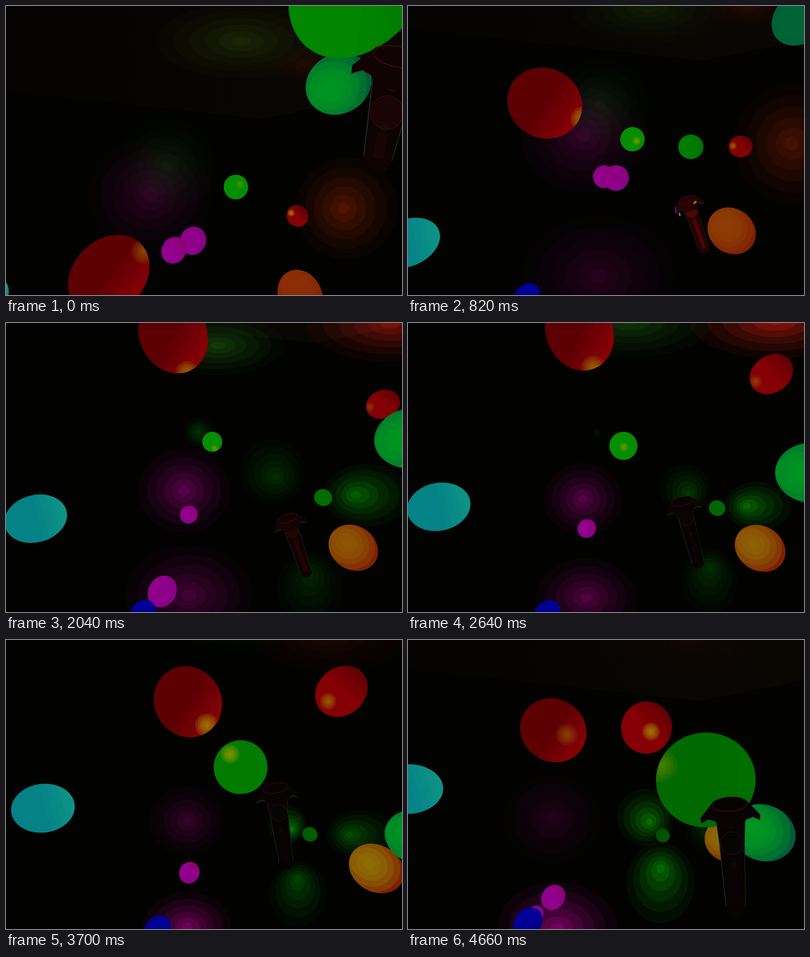
An HTML page with a canvas for the animation above (4.76 s loop, 875 by 640 pixels).

```html
<!DOCTYPE html>
<html lang="en">
<head>
<meta charset="utf-8">
<title>Glowing balls</title>
<style>
  html, body { margin: 0; width: 100%; height: 100%; overflow: hidden; background: #020201; }
  canvas { display: block; }
</style>
</head>
<body>
<canvas id="stage" width="875" height="640"></canvas>
<script>
const ctx = document.getElementById('stage').getContext('2d');
const LOOP = 4760, LAST = 77, TAU = Math.PI * 2;
const VIEW = { x: 500, y: 320, focal: 500 };
const YELLOW = [165, 150, 0];
let step = 0, pan = [0, 0];

const clamp = (v, lo = 0, hi = 1) => Math.min(hi, Math.max(lo, v));
const mix = (a, b, t) => a.map((v, i) => v + (b[i] - v) * t);
const rgb = c => `rgb(${c.map(v => Math.round(clamp(v, 0, 255))).join()})`;
const distance = (a, b) => Math.hypot(b.x - a.x, b.y - a.y);

// Smooth curve through a few keys [step, ...values], without overshoot.
function follow(keys) {
  const s = clamp(step, keys[0][0], keys[keys.length - 1][0]);
  let k = 0;
  while (k < keys.length - 2 && s >= keys[k + 1][0]) k++;
  const span = keys[k + 1][0] - keys[k][0], t = (s - keys[k][0]) / span, u = 1 - t;
  return keys[0].slice(1).map((_, i) => {
    const c = i + 1;
    const slope = n => (keys[n + 1][c] - keys[n][c]) / (keys[n + 1][0] - keys[n][0]);
    const tangent = n => {
      const a = slope(Math.max(0, n - 1)), b = slope(Math.min(n, keys.length - 2));
      return a * b > 0 ? 2 * a * b / (a + b) : 0;
    };
    return keys[k][c] * (1 + 2 * t) * u * u + keys[k + 1][c] * t * t * (3 - 2 * t)
      + span * t * u * (tangent(k) * u - tangent(k + 1) * t);
  });
}

// Keys hold room coordinates; the camera pan moves everything alike.
function place(...keys) {
  const [x, y, r, light] = follow(keys);
  return { x: x + pan[0], y: y + pan[1], r, light };
}

function oval(x, y, rx, ry = rx, rot = 0) {
  ctx.beginPath();
  ctx.ellipse(x, y, rx, ry, rot, 0, TAU);
}

// Banded pool of light; its core is shifted by dx, dy.
function glow({ x, y, r, light }, color, aspect = 1, dx = 0, dy = 0) {
  const n = 6, level = i => (i / n) ** 1.3;
  ctx.globalCompositeOperation = 'lighter';
  for (let i = 0; i < n; i++) {
    const s = (1 - i / n) ** 1.2, gain = light * (level(i + 1) - level(i));
    ctx.fillStyle = rgb(color.map(v => v * gain));
    oval(x + dx * (1 - s), y + dy * (1 - s), r * s * aspect, r * s / aspect);
    ctx.fill();
  }
  ctx.globalCompositeOperation = 'source-over';
}

function bands(gradient, from, to, curve) {
  const n = 6;
  for (let i = 0; i < n; i++) {
    const c = rgb(mix(from, to, (i / (n - 1)) ** curve));
    gradient.addColorStop(i / n, c);
    gradient.addColorStop((i + 1) / n, c);
  }
  return gradient;
}

// A sphere in wide-angle perspective: stretched away from the middle of the view.
function ball(b, from, to, dir, lamp) {
  const d = distance(b, VIEW), rot = Math.atan2(b.y - VIEW.y, b.x - VIEW.x);
  ctx.save();
  ctx.translate(b.x, b.y);
  ctx.rotate(rot);
  ctx.scale(b.r * Math.hypot(1, d / VIEW.focal), b.r);
  oval(0, 0, 1);
  if (dir === 'centre') {
    ctx.fillStyle = bands(ctx.createRadialGradient(-.3, 0, 0, -.3, 0, 1.35), from, to, 2);
  } else {
    const cx = Math.cos(dir - rot), cy = Math.sin(dir - rot);
    ctx.fillStyle = bands(ctx.createLinearGradient(-.1 * cx, -.1 * cy, cx, cy), from, to, 1);
  }
  ctx.fill();
  ctx.clip();
  ctx.setTransform(1, 0, 0, 1, 0, 0);
  if (lamp) highlight(b, lamp);
  ctx.restore();
}

// Light of a neighbour: the nearer the neighbour is to us, the more central the spot.
function highlight(b, lamp) {
  const far = distance(b, lamp), offset = b.r * (1.4 - .62 * lamp.r / b.r) / far;
  ctx.fillStyle = rgb(YELLOW);
  ctx.globalAlpha = .35 * clamp(1 - far / 500);
  for (let i = 5; i > 0; i--) {
    oval(b.x + (lamp.x - b.x) * offset, b.y + (lamp.y - b.y) * offset, b.r * .07 * i);
    ctx.fill();
  }
}

function room() {
  ctx.fillStyle = '#020201';
  ctx.fillRect(0, 0, 875, 640);
  const { x, y } = place([0, 647, 232], [13, 662, 236], [24, 685, 194], [44, 690, -20], [67, 700, 0], [77, 727, 140]);
  const shade = ctx.createLinearGradient(0, 0, 875, 0);
  shade.addColorStop(0, '#040302');
  shade.addColorStop(1, '#0a0703');
  ctx.fillStyle = shade;
  ctx.beginPath();
  [[0, -300], [0, y - x * .11], [x, y], [875, y - (875 - x) * .2], [875, -300]].forEach(p => ctx.lineTo(...p));
  ctx.fill();
}

function lights() {
  const green = [.03, 1, .02], purple = [1, .02, .8];
  // ceiling
  glow(place([0, 602, 60, 124, 30], [13, 542, 120, 115, 24], [24, 448, 132, 75, 56],
    [44, 503, 5, 122, 52], [67, 510, -60, 90, 0]), [.25 + .35 * clamp(1 - step / 24), 1, .1], 1.5);
  glow(place([13, 762, 115, 62, 26], [24, 870, 67, 120, 56], [44, 823, 5, 125, 140],
    [54, 730, -10, 115, 38], [77, 700, -5, 130, 10]), [1, .12, .06], 1.5);
  // back wall
  glow(place([0, 400, 400, 130, 40], [13, 400, 400, 134, 46], [24, 400, 400, 118, 90],
    [44, 400, 400, 83, 80], [67, 400, 400, 80, 38], [77, 400, 400, 102, 30]), purple, 1.04);
  glow(place([13, 437, 335, 105, 22], [24, 435, 302, 63, 66], [44, 430, 252, 11, 20], [54, 430, 252, 0, 0]), green);
  glow(place([13, 570, 355, 54, 0], [24, 565, 347, 86, 24], [44, 625, 377, 54, 56],
    [67, 620, 411, 42, 118], [77, 607, 397, 63, 104]), green, 1, 9, 12);
  // right wall
  glow(place([0, 834, 430, 112, 78], [13, 867, 420, 135, 66], [24, 870, 320, 90, 0]), [1, .22, .03], 1, -8, 0);
  glow(place([13, 850, 430, 110, 0], [24, 830, 407, 104, 72], [44, 787, 415, 63, 98],
    [67, 783, 432, 64, 56], [77, 762, 430, 57, 28]), green, 1.18, -28, 0);
  // floor
  glow(place([0, 462, 790, 150, 20], [24, 416, 662, 148, 46], [44, 407, 618, 98, 76],
    [67, 400, 640, 86, 112], [77, 412, 645, 118, 112]), purple, 1.12);
  glow(place([13, 690, 760, 80, 0], [24, 678, 672, 88, 26], [44, 679, 583, 67, 42],
    [67, 638, 555, 68, 74], [77, 640, 543, 82, 100]), green, .92, 0, -36);
}

function balls(hand) {
  const bigRed = place([0, 309, 579, 79], [13, 314, 330, 77], [24, 353, 113, 76],
    [44, 392, 29, 74], [54, 401, 100, 75], [77, 403, 205, 69]);
  const red = place([0, 726, 447, 23], [13, 747, 426, 24], [24, 852, 322, 25],
    [44, 816, 123, 41], [54, 784, 96, 50], [77, 609, 199, 56]);
  const nearing = place([0, 590, 383, 27], [13, 508, 410, 27], [24, 446, 315, 18],
    [44, 489, 282, 31], [67, 536, 280, 73], [77, 740, 315, 105]);
  const leaving = place([0, 867, -78, 140], [13, 637, 427, 27], [24, 713, 413, 21], [44, 696, 420, 17], [77, 645, 438, 15]);
  const sea = place([0, 817, 154, 66], [13, 888, 135, 58], [24, 900, 217, 66],
    [44, 911, 342, 68], [67, 917, 448, 60], [77, 867, 432, 62]);

  ball(place([0, 495, 502, 29], [13, 472, 496, 28], [24, 417, 548, 32],
    [44, 312, 672, 28], [67, 346, 618, 12], [77, 362, 614, 18]), [142, 0, 138], [136, 0, 132], 0);
  ball(place([13, 9, 640, 52], [24, 53, 526, 52], [44, 81, 417, 53], [77, 82, 335, 55]), [4, 130, 134], [14, 146, 134], -.25);
  ball(place([13, 274, 761, 27], [24, 294, 703, 28], [44, 320, 657, 28], [77, 347, 631, 29]), [0, 0, 150], [0, 0, 134], 1);
  ball(place([0, 453, 523, 27], [13, 446, 493, 25], [24, 415, 448, 19],
    [44, 408, 465, 20], [77, 403, 575, 25]), [144, 0, 140], [142, 0, 118], -.6);
  ball(bigRed, [92, 0, 4], [132, 0, 5], .6, nearing);
  ball(red, [132, 0, 5], [100, 0, 4], -.8, nearing);
  ball(place([0, 732, 623, 48], [13, 727, 613, 49], [24, 754, 558, 48],
    [44, 791, 509, 49], [67, 822, 502, 52], [77, 787, 449, 46]), [140, 46 + 60 * clamp(step / 54), 4], [126, 32, 2], 'centre');
  const lit = clamp((480 - distance(sea, hand)) / 130);
  ball(sea, mix([0, 100, 52], [0, 148, 32], lit), [0, 92, 56], 'centre');
  const fade = [0, 134 - step * .7, 0];
  ball(leaving, fade, mix(fade, [0, 100, 0], .4), 0);
  const near = mix([4, 142, 0], [0, 105, 0], clamp((nearing.r - 45) / 28));
  ball(nearing, near, mix(near, [4, 134, 0], .2), 0, bigRed);
}

function line(color, width, ...points) {
  ctx.strokeStyle = color;
  ctx.lineWidth = width;
  ctx.beginPath();
  points.forEach(p => ctx.lineTo(...p));
  ctx.stroke();
}

function handPose() {
  const [x, y, angle, scale] = follow([[0, 842, 236, .2, 1.75], [13, 626, 456, -.34, .62], [24, 650, 485, -.36, .65],
    [44, 615, 433, -.26, .74], [54, 648, 425, -.08, 1], [67, 567, 352, -.2, .75], [77, 716, 450, -.06, 1.2]]);
  return { x, y, angle, scale };
}

// Drawn around its touch pad; leaning it foreshortens the head or the handle.
function controller({ x, y, angle, scale }) {
  const head = Math.min(62, 68 + 95 * angle), tail = 138 - 270 * (angle + .34) ** 2;
  const heat = 60 * Math.exp(-(((step - 18) / 15) ** 2));
  ctx.save();
  ctx.translate(x, y);
  ctx.rotate(angle);
  ctx.scale(scale, scale);

  ctx.fillStyle = rgb([6 + heat * .5, 3, 2]);
  ctx.beginPath();
  ctx.moveTo(27, 14 - head);
  ctx.lineTo(23, 0);
  ctx.arc(0, tail, 18, 0, Math.PI);
  ctx.lineTo(-23, 0);
  ctx.lineTo(-27, 14 - head);
  ctx.fill();
  line(rgb([6 + heat * 1.3, 4, 4]), 14, [0, 26], [0, tail]);
  line('#20242c', 1.5, [-27, 14 - head], [-23, 0], [-18, tail]);
  line('#16300f', 1, [27, 14 - head], [23, 0], [18, tail]);

  ctx.fillStyle = rgb([6 + heat * 1.4, 4, 4]);
  ctx.strokeStyle = '#260c08';
  ctx.lineWidth = 1.3;
  oval(0, 0, 21);
  ctx.fill();
  ctx.stroke();
  for (const button of [-head * .5, tail * .35]) {
    oval(0, button, 4, 3);
    ctx.stroke();
  }

  // head with a hook on each side
  ctx.translate(0, -head);
  const half = [[-34, -12], [-55, 12], [-54, 23], [-41, 16], [-30, 19], [-18, 32]];
  const mirrored = half.map(([px, py]) => [-px, py]).reverse();
  ctx.fillStyle = rgb([9 + heat * .5, 4, 3]);
  ctx.beginPath();
  [...half, ...mirrored].forEach(p => ctx.lineTo(...p));
  ctx.ellipse(0, -10, 34, 14, 0, 0, Math.PI, true);
  ctx.fill();
  line('#303038', 1.5, [-53, 22], [-41, 16], [-30, 20]);
  line('#1c4a30', 1.5, [53, 22], [41, 16], [32, 20]);
  ctx.fillStyle = rgb([5 + heat * .6, 3, 2]);
  ctx.strokeStyle = '#400808';
  oval(0, -10, 32, 13);
  ctx.fill();
  ctx.stroke();
  if (heat > 20) {
    ctx.fillStyle = '#8a7a08';
    oval(24, 8, 7, 4, -.4);
    ctx.fill();
    oval(-42, 30, 3, 7, .2);
    ctx.fill();
    line('#70108a', 4, [-46, 0], [-54, 22]);
  }
  ctx.restore();
}

const start = performance.now();
function draw() {
  const t = (performance.now() - start) % LOOP;
  // steps last 100 and 20 ms in turn
  step = Math.min(LAST, 2 * Math.floor(t / 120) + (t % 120 >= 100 ? 1 : 0));
  pan = follow([[0, -82, 18], [13, -12, -115], [24, 0, -57], [44, -13, -10], [54, 0, 0], [67, 0, 2], [77, -82, -5]]);
  const hand = handPose();
  room();
  lights();
  balls(hand);
  controller(hand);
  requestAnimationFrame(draw);
}
draw();
</script>
</body>
</html>
```
